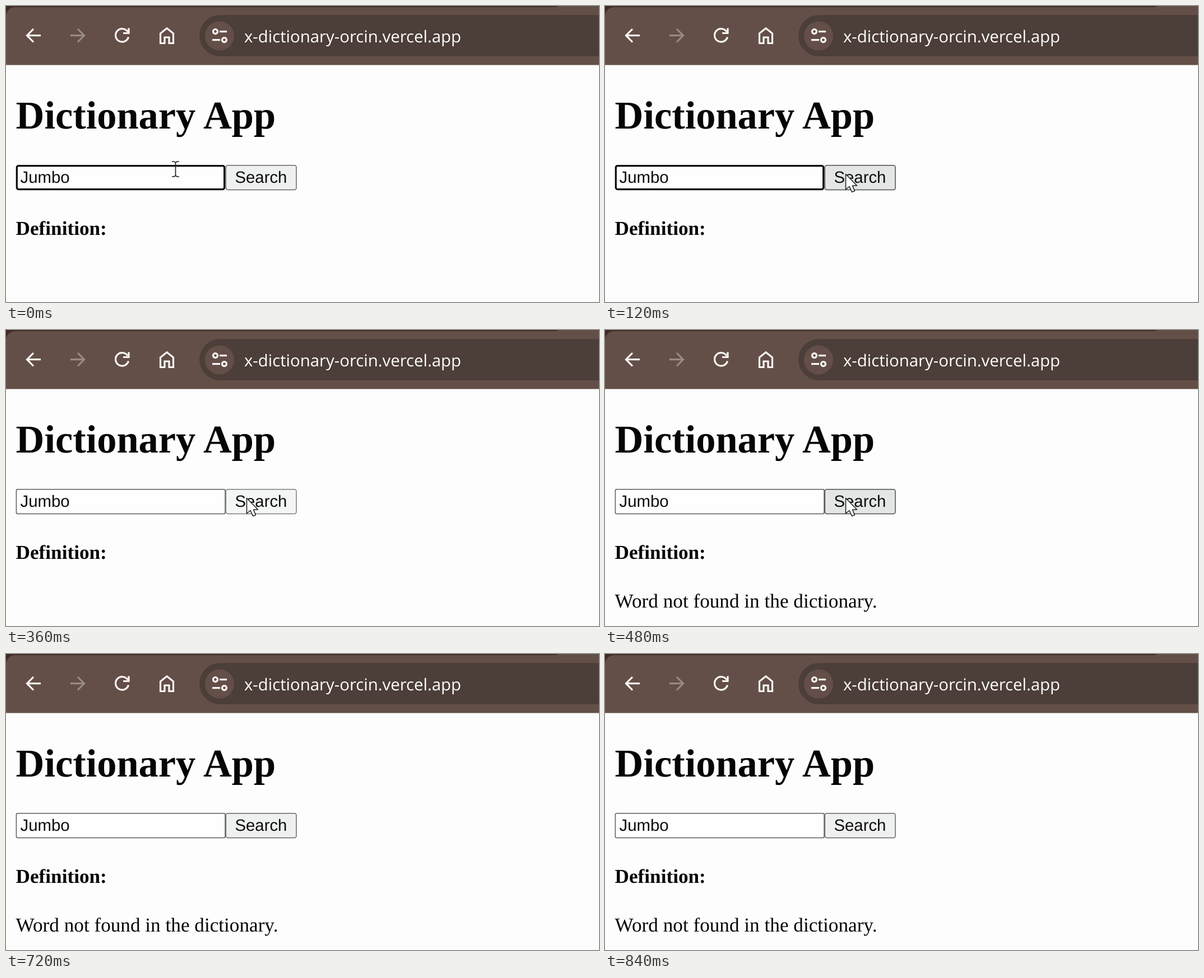
Write an HTML page that moves like this. It is 1058x529 px and loops after 0.96 s.

```html
<!DOCTYPE html>
<html lang="en">
<head>
<meta charset="utf-8">
<title>Dictionary App</title>
<style>
  html, body { margin: 0; width: 100%; height: 100%; overflow: hidden; background: #fdfdfd; }
  svg { display: block; width: 100vw; height: 100vh; }
  text { text-rendering: geometricPrecision; }
  .serif { font-family: "Liberation Serif", "Times New Roman", serif; fill: #050505; }
  .sans { font-family: "Liberation Sans", Arial, sans-serif; font-size: 29.33px; fill: #0c0c0c; }
  .url { font-family: "Open Sans", "Noto Sans", sans-serif; font-size: 29.35px; fill: #fff; }
  .bold { font-weight: bold; }
  .icon { fill: none; stroke: #fbf8f6; stroke-width: 3.2; }
</style>
</head>
<body>
<svg viewBox="0 0 1058 529" preserveAspectRatio="none">
  <rect width="1058" height="529" fill="#fdfdfd"/>

  <g id="toolbar">
    <rect width="1058" height="105.5" fill="#644f48"/>
    <path d="M0 0H985Q983 2 978 2H16Q3 3 0 16Z" fill="#402b27"/>
    <path d="M1058 16H382a37 37 0 0 0 0 74H1058Z" fill="#4c3e38"/>
    <circle cx="381" cy="53.5" r="26" fill="#644f48"/>
    <g class="icon">
      <path d="M62 52.7H38M49 41L37.5 52.7L49 64.5"/>
      <path d="M115 52.7H139M128 41L139.5 52.7L128 64.5" stroke="#998a84"/>
      <path d="M217 46A11.7 11.7 0 1 0 218.5 55.5M219 39.5V48.5H209"/>
      <path d="M275.5 66.5V49L287 39.8L298.500 49V66.5H291V56H283V66.5Z"/>
      <circle cx="373.500" cy="45.6" r="4"/>
      <circle cx="389.500" cy="60.6" r="4"/>
      <path d="M381 45.6H394M368 60.6H382"/>
    </g>
    <text class="url" x="425" y="65.4">x-dictionary-orcin.vercel.app</text>
  </g>

  <text class="serif bold" x="17.600" y="219" font-size="70.4">Dictionary App</text>

  <rect id="field" fill="#fefefe"/>
  <text class="sans" x="25.600" y="316">Jumbo</text>
  <path id="caret" d="M113.500 290V323" stroke="#111" stroke-width="1.800"/>

  <rect id="button" x="392.300" y="284.800" width="125.700" height="43.700" rx="3.500" stroke-width="1.500"/>
  <text class="sans" x="408.500" y="316">Search</text>

  <text class="serif bold" x="17.600" y="409" font-size="35.2">Definition:</text>
  <text id="result" class="serif" x="17.600" y="495.500" font-size="35.2">Word not found in the dictionary.</text>

  <path id="beam" d="M296 278H300L302.500 280L305 278H309M302.500 280V303M296 305H300L302.500 303L305 305H309"
        fill="none" stroke="#222" stroke-width="1.700"/>
  <path id="arrow" d="M0 0V27.500L6.500 22L11 32L16 30L12 20.500H20Z"
        fill="#fdfdfd" stroke="#22252b" stroke-width="1.600" stroke-linejoin="round"/>
</svg>

<script>
  const LOOP = 960;
  const $ = id => document.getElementById(id);
  const show = (id, on) => $(id).setAttribute("visibility", on ? "visible" : "hidden");
  const set = (id, attrs) => {
    for (const name in attrs) $(id).setAttribute(name, attrs[name]);
  };

  const FIELD = {
    focused: { x: 19.3, y: 285.6, width: 370.4, height: 42, rx: 3, stroke: "#0a0a0a", "stroke-width": 3.2 },
    blurred: { x: 18.4, y: 284.8, width: 372.6, height: 43.7, rx: 2.5, stroke: "#5b5b5b", "stroke-width": 1.5 }
  };
  const BUTTON = {
    idle: { fill: "#eff0f0", stroke: "#666" },
    hover: { fill: "#e4e6e6", stroke: "#4c4c4c" },
    pressed: { fill: "#f4f6f6", stroke: "#7c7c7c" }
  };

  const onButton = { arrow: [429.5, 300.5], button: "hover" };
  const STATES = [
    { from: 0, focused: true, beam: true },
    { from: 120, focused: true, ...onButton },
    { from: 240, focused: true, caret: true, ...onButton },
    { from: 360, ...onButton, button: "pressed" },
    { from: 480, ...onButton, result: true },
    { from: 600, arrow: [985.3, 221.5], result: true },
    { from: 720, result: true }
  ];

  function render(time) {
    const state = STATES.findLast(s => s.from <= time);
    set("field", state.focused ? FIELD.focused : FIELD.blurred);
    set("button", BUTTON[state.button || "idle"]);
    show("caret", state.caret);
    show("result", state.result);
    show("beam", state.beam);
    show("arrow", state.arrow);
    if (state.arrow) set("arrow", { transform: `translate(${state.arrow})` });
  }

  const start = performance.now();
  function tick() {
    render((performance.now() - start) % LOOP);
    requestAnimationFrame(tick);
  }
  tick();
</script>
</body>
</html>
```
